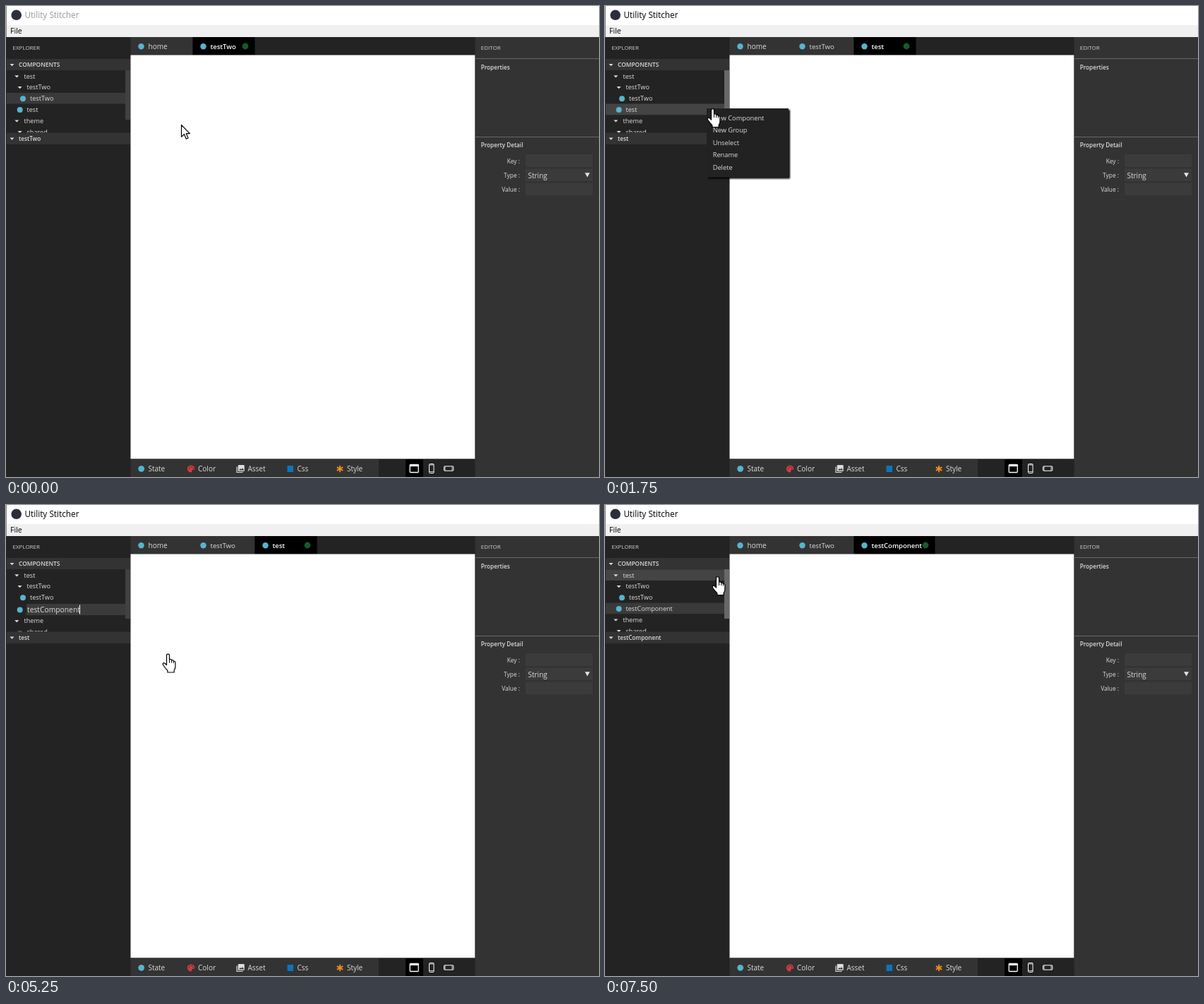
Recreate the animation shown at these times as an HTML page. Size 840x667 px, loop 8000 ms.

```html
<!DOCTYPE html>
<html lang="en">
<head>
<meta charset="utf-8">
<title>Component rename</title>
<style>
  html, body { margin: 0; width: 100%; height: 100%; overflow: hidden; background: #232323; }
  svg { display: block; width: 840px; height: 667px; font-family: "Open Sans", "Noto Sans", sans-serif; }
  text { fill: #dcdcdc; font-size: 10px; white-space: pre; }
  .small { font-size: 8px; fill: #cfcfcf; }
  .bold { font-size: 8.2px; font-weight: 600; }
  .tree text { font-size: 9.15px; }
  .menu text { font-size: 9.25px; }
  .label { font-size: 8.4px; text-anchor: end; }
  .active { font-size: 9.5px; font-weight: 600; fill: #fff; }
  .panel { fill: #333; }
  .field { fill: #3b3b3b; }
  .brand { fill: #56b4cf; }
  .line { fill: none; stroke: #fff; }
  #scroll { fill: #414141; }
  #scroll.on { fill: #686868; }
</style>
</head>
<body>
<svg viewBox="0 0 840 667">
  <defs>
    <path id="down" d="M-3-1.4H3L0 1.8Z" fill="#dcdcdc"/>
    <clipPath id="list"><rect y="91" width="176" height="88.5"/></clipPath>
    <filter id="shade" x="-10%" y="-10%" width="125%" height="125%">
      <feDropShadow dx="2" dy="2" stdDeviation="1" flood-color="#000"/>
    </filter>
  </defs>

  <!-- window frame -->
  <rect width="840" height="27" fill="#fff"/>
  <rect y="27" width="840" height="17" fill="#f0f0f0"/>
  <rect width="1" height="44" fill="#8a8a8a"/>
  <circle cx="14.7" cy="12.8" r="7.3" fill="#2b2e3b"/>
  <text id="title" x="26.5" y="17" style="font-size:11.8px">Utility Stitcher</text>
  <text x="6" y="39" style="font-size:10.6px;fill:#000">File</text>

  <!-- explorer -->
  <rect y="44" width="177" height="623" fill="#232323"/>
  <text class="small" x="9.5" y="62">EXPLORER</text>
  <rect class="panel" x="1" y="75" width="175.5" height="16"/>
  <use href="#down" x="8.5" y="83.5"/>
  <text class="bold" x="18" y="86.2" style="font-size:8.4px">COMPONENTS</text>
  <g class="tree" clip-path="url(#list)">
    <rect id="selected" x="1" width="175.5" height="15.5" fill="#3a3a3a"/>
    <rect id="hover" x="1" width="175.5" height="15.5" fill="#444"/>
    <use href="#down" x="15.3" y="99.7"/><text x="25.5" y="102.7">test</text>
    <use href="#down" x="19.6" y="115.4"/><text x="29.5" y="118.4">testTwo</text>
    <circle class="brand" cx="24" cy="131.2" r="4"/><text x="34" y="134.3">testTwo</text>
    <text id="item" x="29.5" y="150">test</text>
    <g id="rest">
      <use href="#down" x="15.3" y="162.8"/><text x="25.5" y="165.8">theme</text>
      <use href="#down" x="19.6" y="178.5"/><text x="29.5" y="181.5">shared</text>
    </g>
    <g id="input">
      <rect x="29" y="140" width="147.5" height="16" class="field"/>
      <text id="typed" x="30" y="152" style="font-size:10.3px"></text>
      <rect id="caret" y="141.5" width="1" height="13" fill="#fff"/>
    </g>
    <circle id="itemIcon" class="brand" cx="19.7" cy="147" r="4"/>
    <rect id="scroll" x="169" y="91" width="7" height="70"/>
  </g>
  <rect class="panel" x="1" y="179.5" width="175.5" height="16.5"/>
  <use href="#down" x="8.5" y="188"/>
  <text id="outline" class="bold" x="18" y="190.8"></text>

  <!-- tabs -->
  <rect x="176.5" y="44" width="488" height="25.5" fill="#232323"/>
  <rect id="idle" class="panel" x="176.5" y="44" height="25.5"/>
  <rect id="tab" y="44" height="25.5"/>
  <circle class="brand" cx="191.5" cy="57.3" r="4.2"/>
  <text x="201.5" y="60.7">home</text>
  <circle class="brand" cx="279.5" cy="57.3" r="4.2"/>
  <text id="two" x="289.5" y="60.7" style="font-size:9.7px">testTwo</text>
  <circle id="tabIcon" class="brand" cx="367.5" cy="57.3" r="4.2"/>
  <text id="tabText" class="active" y="60.7"></text>
  <circle id="dot" cy="57" r="4.4" fill="#145c2b"/>

  <!-- canvas and bottom bar -->
  <rect x="176.5" y="69.5" width="488" height="572" fill="#fff"/>
  <rect x="176.5" y="641.5" width="488" height="25.5" fill="#232323"/>
  <rect class="panel" x="176.5" y="642" width="351.5" height="25"/>
  <circle class="brand" cx="191.7" cy="655.3" r="4.4"/>
  <text x="201.5" y="659.2">State</text>
  <path d="M262 650.4a5 5 0 1 0 .8 9.9q1.3-.6.4-2.2-.2-1.3 1.2-1.3h1.8q1-.2 1-1.6a5 5 0 0 0-5.2-4.8Z" fill="#d23b42"/>
  <g fill="#333">
    <circle cx="259.4" cy="655.2" r=".8"/><circle cx="260.6" cy="652.9" r=".8"/>
    <circle cx="263.2" cy="652.6" r=".8"/><circle cx="265" cy="654.6" r=".8"/>
  </g>
  <text x="272" y="659.2">Color</text>
  <path d="M327 652.5v8h8.5" fill="none" stroke="#ddd" stroke-width="1.2"/>
  <rect x="328.7" y="650" width="9" height="9" rx="1" fill="#ddd"/>
  <path d="M330 657.5l2-2.6 1.4 1.6 1.5-2.2 2.2 3.2Z" fill="#333"/>
  <text x="342.5" y="659.2">Asset</text>
  <rect x="398.5" y="651" width="8.5" height="9" fill="#0f74b8"/>
  <text x="412.5" y="659.2">Css</text>
  <path d="M473 650.7v9.6M468.8 653.1l8.4 4.8M477.2 653.1l-8.4 4.8" stroke="#f08e1c" stroke-width="1.8"/>
  <text x="483" y="659.2">Style</text>
  <rect x="566" y="642" width="25" height="25"/>
  <rect class="line" x="572.2" y="649.5" width="12" height="11" rx="1" stroke-width="1.3"/>
  <rect x="572" y="649" width="12.5" height="3" fill="#fff"/>
  <rect class="line" x="599.5" y="648.5" width="6.5" height="13" rx="1"/>
  <path class="line" d="M600 650h6M600 659.5h6" stroke-width=".8"/>
  <rect class="line" x="620.5" y="651.8" width="13.3" height="6.4" rx="1"/>
  <path class="line" d="M622 652v6M632 652v6" stroke-width=".8"/>

  <!-- editor -->
  <rect class="panel" x="664.5" y="44" width="175.5" height="623"/>
  <text class="small" x="672.7" y="62">EDITOR</text>
  <path d="M664.5 74.5H840M664.5 185.5H840" stroke="#686868"/>
  <text class="bold" x="672.7" y="89.8">Properties</text>
  <text class="bold" x="672.7" y="200.3">Property Detail</text>
  <text class="label" x="728" y="223">Key :</text>
  <text class="label" x="728" y="243.2">Type :</text>
  <text class="label" x="728" y="263.4">Value :</text>
  <rect class="field" x="736" y="210" width="95" height="18"/>
  <rect class="field" x="736" y="230.5" width="95" height="17.5"/>
  <rect class="field" x="736" y="250.5" width="95" height="17.5"/>
  <text x="739.5" y="243.5">String</text>
  <path d="M820 236.3h7l-3.5 6.2Z" fill="#e4e4e4"/>

  <!-- context menu -->
  <g id="menu" class="menu">
    <rect x="144" y="145" width="116" height="97.5" fill="#222" filter="url(#shade)"/>
    <rect id="pick" x="144.5" width="113.5" height="17.5" fill="#444"/>
    <text x="152.7" y="161.6">New Component</text>
    <text x="152.7" y="179.2">New Group</text>
    <text x="152.7" y="196.8">Unselect</text>
    <text x="152.7" y="214.4">Rename</text>
    <text x="152.7" y="232">Delete</text>
  </g>

  <!-- pointers -->
  <g fill="#fff" stroke="#000" stroke-width="1.2" stroke-linejoin="round">
    <path id="arrow" d="M.5.5V17.2L4.4 13.6 7.2 20.2 10 19 7.2 12.6H12.4Z"/>
    <g id="hand">
      <path d="M6 2.4Q6 .6 8 .6T10 2.4V8Q12.8 7.4 13.2 9.2 15.4 8.7 15.9 10.5 18.4 10.4 18.4 13V18.5Q18.4 21 16.6 23.5V26.5H7.4V24Q4 20.5 1.4 16.5-.2 13.6 1.8 13.2 3.4 13 6 16Z"/>
      <path d="M10 8V13M13.2 9.2V13M15.9 10.5V13.5" stroke-width="1"/>
    </g>
  </g>
</svg>
<script>
  const LOOP = 8000, NONE = -1;
  const $ = id => document.getElementById(id);
  const show = (id, on) => $(id).style.display = on ? "" : "none";
  const set = (id, name, value) => $(id).setAttribute(name, value);
  const rowTop = i => 91.4 + 15.75 * i;

  // Each step changes only the listed parts of the state.
  const steps = [
    [0, { shape: "arrow", at: [248, 168], selected: 2, hover: NONE, pick: NONE,
          lit: false, focused: false, menu: false, opened: false, typed: null, caret: false, name: "test" }],
    [250, { at: [156, 131] }],
    [500, { shape: "hand", at: [144.5, 145], hover: 3, lit: true }],
    [1000, { focused: true }],
    [1250, { opened: true, selected: 3 }],
    [1750, { menu: true }],
    [2000, { at: [190, 178], pick: 1, lit: false }],
    [2250, { at: [222, 223], pick: 4 }],
    [2500, { at: [217, 212], pick: 3 }],
    [2750, { at: [221.5, 210.5] }],
    [3000, { menu: false, hover: NONE, selected: NONE, typed: 4, caret: true }],
    [3500, { caret: false }],
    [4000, { caret: true }],
    [4500, { typed: 5 }],
    [4750, { typed: 7 }],
    [5000, { typed: 10 }],
    [5250, { typed: 13 }],
    [5500, { typed: null, name: "testComponent", selected: 3 }],
    [6500, { shape: "arrow", at: [148, 115], hover: 2 }],
    [6750, { shape: "hand", at: [145, 115], hover: 1, lit: true }],
    [7250, { at: [151.5, 101], hover: 0 }]
  ];

  function placeRow(id, row) {
    show(id, row !== NONE);
    set(id, "y", rowTop(row));
  }

  function drawTabs(s) {
    const left = s.opened ? 352.5 : 264.5;
    const label = s.opened ? s.name : "testTwo";
    const width = label === "testComponent" ? 115 : 88;
    set("idle", "width", left - 176.5);
    set("tab", "x", left);
    set("tab", "width", width);
    set("tabText", "x", left + 25);
    set("dot", "cx", left + width - 13.5);
    $("tabText").textContent = $("outline").textContent = label;
    show("two", s.opened);
    show("tabIcon", s.opened);
  }

  function drawTree(s) {
    const editing = s.typed !== null;
    placeRow("selected", s.selected);
    placeRow("hover", s.hover);
    $("item").textContent = s.name;
    show("item", !editing);
    show("input", editing);
    set("itemIcon", "cy", editing ? 148.5 : 147);
    set("rest", "transform", `translate(0 ${editing ? 1.6 : 0})`);
    $("scroll").classList.toggle("on", s.lit);
    if (!editing) return;
    $("typed").textContent = "testComponent".slice(0, s.typed);
    set("caret", "x", Math.floor(29.5 + $("typed").getComputedTextLength()));
    show("caret", s.caret);
  }

  function draw(s) {
    $("title").style.fill = s.focused ? "#000" : "#999";
    drawTabs(s);
    drawTree(s);
    show("menu", s.menu);
    show("pick", s.pick !== NONE);
    set("pick", "y", 149.5 + 17.6 * s.pick);
    for (const id of ["arrow", "hand"]) show(id, id === s.shape);
    set(s.shape, "transform", `translate(${s.at})`);
  }

  const start = performance.now();
  let last = NONE;
  function tick() {
    const t = (performance.now() - start) % LOOP;
    const past = steps.filter(([time]) => time <= t);
    if (past.length !== last) {
      last = past.length;
      draw(Object.assign({}, ...past.map(([, part]) => part)));
    }
    requestAnimationFrame(tick);
  }
  tick();
</script>
</body>
</html>
```
